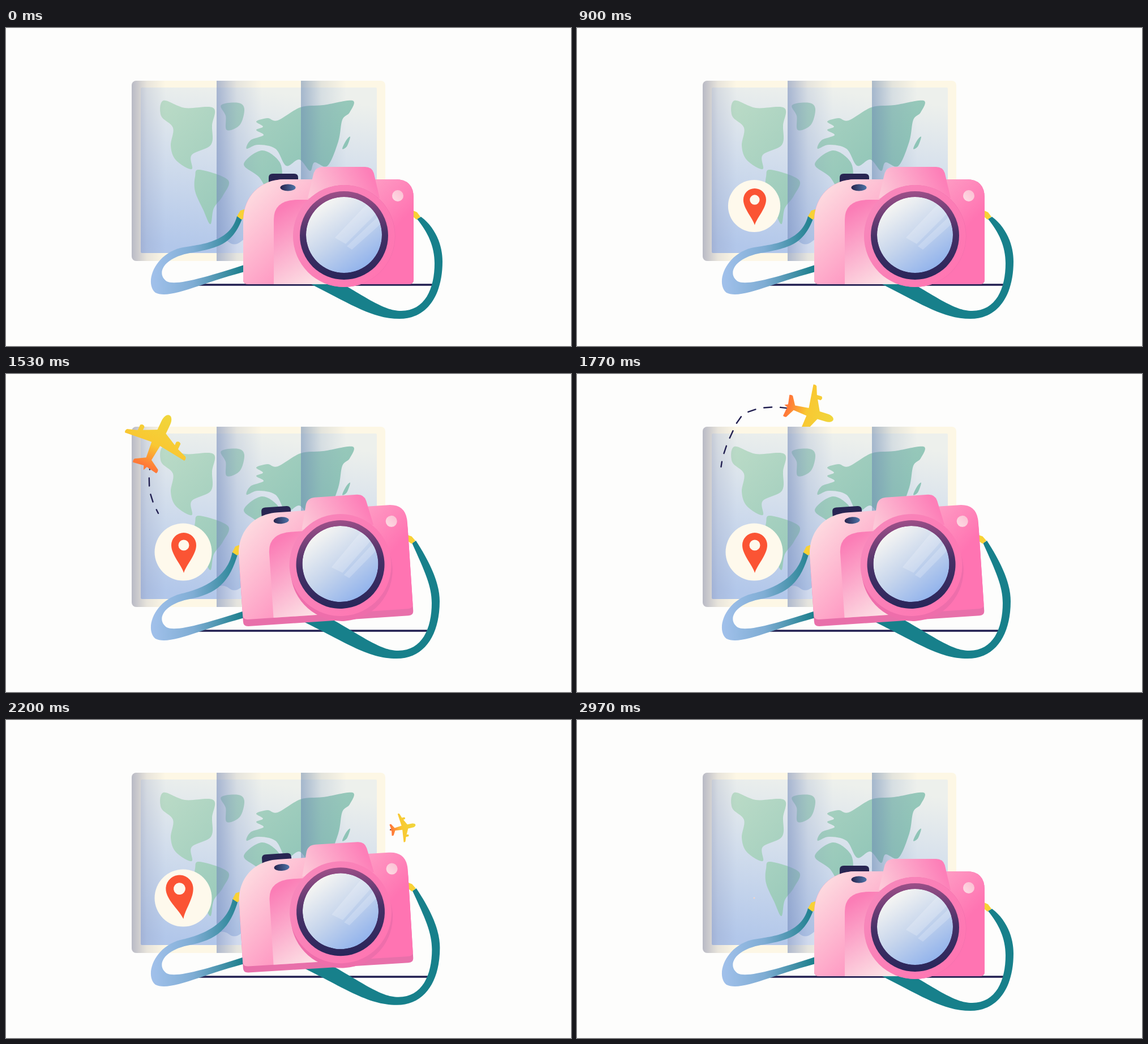
These frames come from a looping animation (998 by 561 pixels, 3010 ms). An HTML page:

```html
<!DOCTYPE html>
<html lang="en">
<head>
<meta charset="utf-8">
<title>Travel camera</title>
<style>
html, body { margin: 0; height: 100%; overflow: hidden; background: #fdfdfc; }
svg { display: block; width: 100vw; height: 100vh; }
</style>
</head>
<body>
<svg id="stage" viewBox="0 0 998 561"></svg>
<script>
const LOOP = 3010;
const NAVY = '#211f50';

// Linear gradient in stage units; stops are "colour offset [opacity]"
const grad = (id, x1, y1, x2, y2, ...stops) =>
  `<linearGradient id="${id}" gradientUnits="userSpaceOnUse" x1="${x1}" y1="${y1}" x2="${x2}" y2="${y2}">` +
  stops.map(s => s.split(' ')).map(([c, o, a = 1]) =>
    `<stop offset="${o}" stop-color="${c}" stop-opacity="${a}"/>`).join('') + '</linearGradient>';

// Smooth curve through "x,y x,y ..."
function smooth(text, closed = true) {
  const pts = text.split(' ').map(p => p.split(',').map(Number));
  const n = pts.length;
  const at = i => closed ? pts[(i + n) % n] : pts[Math.max(0, Math.min(n - 1, i))];
  const ctrl = (p, q, r, k) => [p[0] + (r[0] - q[0]) * k, p[1] + (r[1] - q[1]) * k];
  let d = 'M' + pts[0];
  for (let i = 0; i < (closed ? n : n - 1); i++) {
    const [a, b, c, e] = [at(i - 1), at(i), at(i + 1), at(i + 2)];
    d += `C${ctrl(b, a, c, 1 / 6)} ${ctrl(c, b, e, -1 / 6)} ${c}`;
  }
  return d + (closed ? 'Z' : '');
}

const lands = [
  '278,128 316,141 366,141 364,172 362,206 328,224 328,249 300,233 291,208 295,176 274,155',
  '334,262 342,250 392,268 383,296 367,318 361,346 348,320 334,288',
  '380,136 410,132 421,143 413,171 390,180 388,155',
  '442,165 462,159 480,163 520,140 560,136 612,128 607,149 594,162 587,200 568,243 545,237 537,252 518,232 495,243 476,213 445,206 425,213 432,198 455,189 442,180 454,174',
  '420,240 452,216 483,236 486,268 466,288 446,262',
  '594,213 601,198 608,192 602,209'
].map(s => `<path d="${smooth(s)}"/>`).join('');

const body = 'M419 444V338C420 298 448 267 492 267H688Q720 267 720 300V444Q720 452 711 452H428Q419 452 419 444Z';
const folds = [[222, 60, '#8087ab'], [372, 80, '#6f86ba'], [521, 80, '#6887b2']];
const foldGrads = folds.map(([x, w, c]) =>
  grad('fold' + x, x, 0, x + w, 0, `${c} 0 .55`, `${c} .45 .17`, `${c} 1 0`)).join('');
const foldRects = folds.map(([x, w]) =>
  `<rect x="${x}" y="93" width="${w}" height="318" fill="url(#fold${x})"/>`).join('');

stage.innerHTML = `<defs>
${grad('water', 420, 105, 380, 397, '#edf0ec 0', '#d3deec .45', '#b2c7ea 1')}
${grad('land', 290, 130, 500, 330, '#b9dac6 0', '#8cc3b6 1')}
${foldGrads}
${grad('strapFillL', 260, 0, 418, 0, '#a0c0ea 0', '#7fadd4 .45', '#1c7f8c 1')}
${grad('body', 430, 270, 600, 440, '#fde2e3 0', '#ff74b2 1')}
${grad('grip', 475, 325, 545, 450, '#fb7db6 0', '#fce1e5 1')}
${grad('prism', 540, 300, 640, 252, '#fcc9d8 0', '#fd7fb8 1')}
${grad('mount', 530, 300, 680, 400, '#f787bb 0', '#ff76b2 1')}
${grad('ring', 590, 288, 600, 444, '#9c4f88 0', '#453066 .5', '#29265a 1')}
${grad('glass', 560, 305, 640, 425, '#f8f7f3 0', '#c6d5ec .5', '#8db0ec 1')}
${grad('blade', 540, 310, 650, 425, '#9d5c8f 0', '#593a6e 1')}
${grad('button', 485, 0, 511, 0, '#27254f 0', '#4d73a6 1')}
${grad('lamp', 685, 303, 700, 288, '#fdd9e2 0', '#fcc0d4 1')}
${grad('planeFill', 0, -39, 0, 62, '#f0d63c 0', '#f9c832 .55', '#ff7a38 .92')}
<clipPath id="mapClip"><rect x="222" y="93" width="448" height="318" rx="8"/></clipPath>
<clipPath id="lensClip"><circle cx="597" cy="365" r="67"/></clipPath>
</defs>
<g id="back"><path id="trailBack" fill="none" stroke="${NAVY}" stroke-width="2.4" stroke-linecap="round"/></g>
<g clip-path="url(#mapClip)">
  <rect x="222" y="93" width="448" height="318" fill="#fdf7e5"/>
  <rect x="238" y="105" width="417" height="292" rx="2" fill="url(#water)"/>
  <path d="M372 376Q384 370 394 378T416 376T450 380H521V397H372Z" fill="#f3f6fb" opacity=".75"/>
  <g fill="url(#land)">${lands}</g>
  ${foldRects}
</g>
<path d="M283 453H755" stroke="${NAVY}" stroke-width="3.5"/>
<g id="front"><path id="trailFront" fill="none" stroke="${NAVY}" stroke-width="2.4" stroke-linecap="round"/></g>
<g id="badge">
  <circle r="50.5" fill="#fef9ec"/>
  <path id="pin" fill="#fb5434" fill-rule="evenodd"
    d="M0 0C-4 -14 -22 -32 -22 -49A22 22 0 0 1 22 -49C22 -32 4 -14 0 0ZM-9.500 -49A9.500 9.500 0 0 0 9.500 -49A9.500 9.500 0 0 0 -9.500 -49Z"/>
</g>
<path id="strapLeft" fill="url(#strapFillL)"/>
<path id="strapRight" fill="#17808b"/>
<g id="camera">
  <path d="M408 332L414 322L421 320V335L416 338Z M719 322L726 325L732 333L725 338L719 333Z" fill="#f8d136"/>
  <path d="M464 275V264Q464 257 471 257H509Q516 257 516 264V275Z" fill="#282552"/>
  <path id="base" d="${body}" fill="#e870aa"/>
  <path d="${body}" fill="url(#body)"/>
  <path d="M473 452V338Q473 303 515 303H597V452Z" fill="url(#grip)"/>
  <path d="M533 300L543 258Q546 245 560 245H634Q647 245 650 257L660 300Z" fill="url(#prism)"/>
  <ellipse cx="498" cy="281.500" rx="13.500" ry="6" fill="url(#button)"/>
  <circle cx="692" cy="296" r="10" fill="url(#lamp)"/>
  <circle id="barrel" cx="597.500" cy="367" r="90" fill="#ee6eab"/>
  <circle cx="597" cy="367" r="90" fill="url(#mount)"/>
  <circle cx="597" cy="366" r="78" fill="url(#ring)"/>
  <g clip-path="url(#lensClip)">
    <circle cx="597" cy="365" r="67" fill="url(#glass)"/>
    <path d="M638 310L656 325L600 381L581 370Z M660 330L667 341L611 391L602 385Z" fill="#fff" opacity=".2"/>
    <g id="shutter" fill="url(#blade)" stroke="#b98bb0" stroke-width=".7">${'<path/>'.repeat(6)}</g>
  </g>
</g>
<g id="plane" fill="url(#planeFill)">
  <path d="M0 -40C5 -40 8 -33 8 -26V-9L30 2V-4Q34 -8 38 -4V6L55 12Q58 15 56 19L8 14L5 42L22 52Q24 55 22 59L3 56L0 63L-3 56L-22 59Q-24 55 -22 52L-5 42L-8 14L-56 19Q-58 15 -55 12L-38 6V-4Q-34 -8 -30 -4V2L-8 -9V-26C-8 -33 -5 -40 0 -40Z"/>
</g>`;

const $ = id => document.getElementById(id);
const set = (id, name, value) => $(id).setAttribute(name, value);

const soft = k => k * k * (3 - 2 * k);
const swing = k => soft(k) - .22 * Math.sin(2 * Math.PI * k); // winds up, then overshoots
const unit = (t, a, b) => Math.max(0, Math.min(1, (t - a) / (b - a)));
const pulse = (t, a, b, c, d, ease = soft) => ease(unit(t, a, b)) - ease(unit(t, c, d));

const route = document.createElementNS('http://www.w3.org/2000/svg', 'path');
route.setAttribute('d', smooth(
  '283,272 256,215 255,160 272,108 300,68 370,60 470,92 610,190 740,181 807,150 850,112', false));
const total = route.getTotalLength();
const behind = total * .34; // from here on the flight passes behind the map
const along = k => total * (1 - Math.cos(Math.PI * k)) / 2;

function dashes(from, to, start, step, len) {
  let d = '';
  for (let s = start; s < to; s += step) {
    const a = Math.max(s, from), b = Math.min(s + len, to);
    if (b <= a) continue;
    const p = route.getPointAtLength(a), q = route.getPointAtLength(b);
    d += `M${p.x} ${p.y}L${q.x} ${q.y}`;
  }
  return d;
}

function drawFlight(t) {
  const k = unit(t, 1038, 2688), s = along(k);
  const size = (1.05 - .7 * soft(unit(k, .25, .85))) * pulse(k, 0, .08, .93, 1);
  const p = route.getPointAtLength(s);
  const a = route.getPointAtLength(s - 3), b = route.getPointAtLength(s + 3);
  const turn = Math.atan2(b.x - a.x, a.y - b.y) * 180 / Math.PI;
  set('plane', 'transform', `translate(${p.x} ${p.y}) rotate(${turn}) scale(${size})`);
  const layer = s < behind ? $('front') : $('back');
  if ($('plane').parentNode !== layer) layer.append($('plane'));

  const tail = along(k ** 1.75), head = s - 48 * size, far = total / 2;
  set('trailFront', 'd', dashes(tail, Math.min(head, behind), -6, 29, 14));
  set('trailBack', 'd', dashes(Math.max(tail, behind), Math.min(head, far), -6, 29, 15) +
    dashes(Math.max(tail, far), head, far, 16, .6));
}

function drawStraps(p) {
  const angle = -3.8 * p * Math.PI / 180, cos = Math.cos(angle), sin = Math.sin(angle);
  const held = (x, y) => [
    597 - 6.5 * p + (x - 597) * cos - (y - 365) * sin,
    365 - 30 * p + (x - 597) * sin + (y - 365) * cos
  ];
  const loose = (x, y) => [x - 5 * p, y - 11 * p];
  set('strapLeft', 'd', `M${held(408, 332)}C${held(395, 382)} 335 382 308 388
    C262 400 244 450 264 467C290 480 350 447 430 428V415
    C350 441 300 455 284 447C266 435 275 408 320 398C375 388 ${held(400, 383)} ${held(418, 334)}Z`);
  set('strapRight', 'd', `M${held(733, 333)}C${loose(760, 353)} ${loose(771, 385)} ${loose(771, 412)}
    C${loose(771, 470)} ${loose(745, 513)} ${loose(695, 513)}
    C${loose(640, 513)} ${loose(600, 480)} ${loose(500, 433)}L${loose(560, 432)}
    C${loose(635, 473)} ${loose(665, 499)} ${loose(698, 499)}
    C${loose(740, 499)} ${loose(757, 460)} ${loose(757, 415)}
    C${loose(757, 385)} ${loose(745, 360)} ${held(726, 337)}Z`);
}

function drawShutter(hole) {
  const spot = (k, r) => {
    const a = k * Math.PI / 3, e = a + Math.PI / 3;
    return [597 + hole * Math.cos(a) + r * Math.cos(e), 365 + hole * Math.sin(a) + r * Math.sin(e)];
  };
  [...$('shutter').children].forEach((blade, k) => blade.setAttribute('d',
    `M${spot(k, 0)}L${spot(k, 200)}L${spot(k + 1, 200)}L${spot(k + 1, 0)}Z`));
}

function drawCamera(t) {
  const p = pulse(t, 1240, 1520, 2100, 2400, swing), thick = Math.max(0, p);
  set('camera', 'transform', `translate(${-6.5 * p} ${-30 * p}) rotate(${-3.8 * p} 597 365)`);
  set('base', 'transform', `translate(0 ${12 * thick})`);
  set('barrel', 'transform', `translate(${thick} ${9 * thick})`);
  drawStraps(p);
  drawShutter(80 * (1 - pulse(t, 1800, 1940, 1990, 2140)));
}

function drawBadge(t) {
  const lean = pulse(t, 1930, 2400, 2450, 2740);
  set('badge', 'transform', `translate(313 314) scale(${pulse(t, 680, 950, 2740, 2995)})`);
  set('pin', 'transform', `translate(${1 - lean} 37) rotate(${-12 * lean}) scale(${1 + .16 * lean})`);
}

function frame() {
  const t = performance.now() % LOOP;
  drawFlight(t);
  drawCamera(t);
  drawBadge(t);
  requestAnimationFrame(frame);
}
frame();
</script>
</body>
</html>
```
